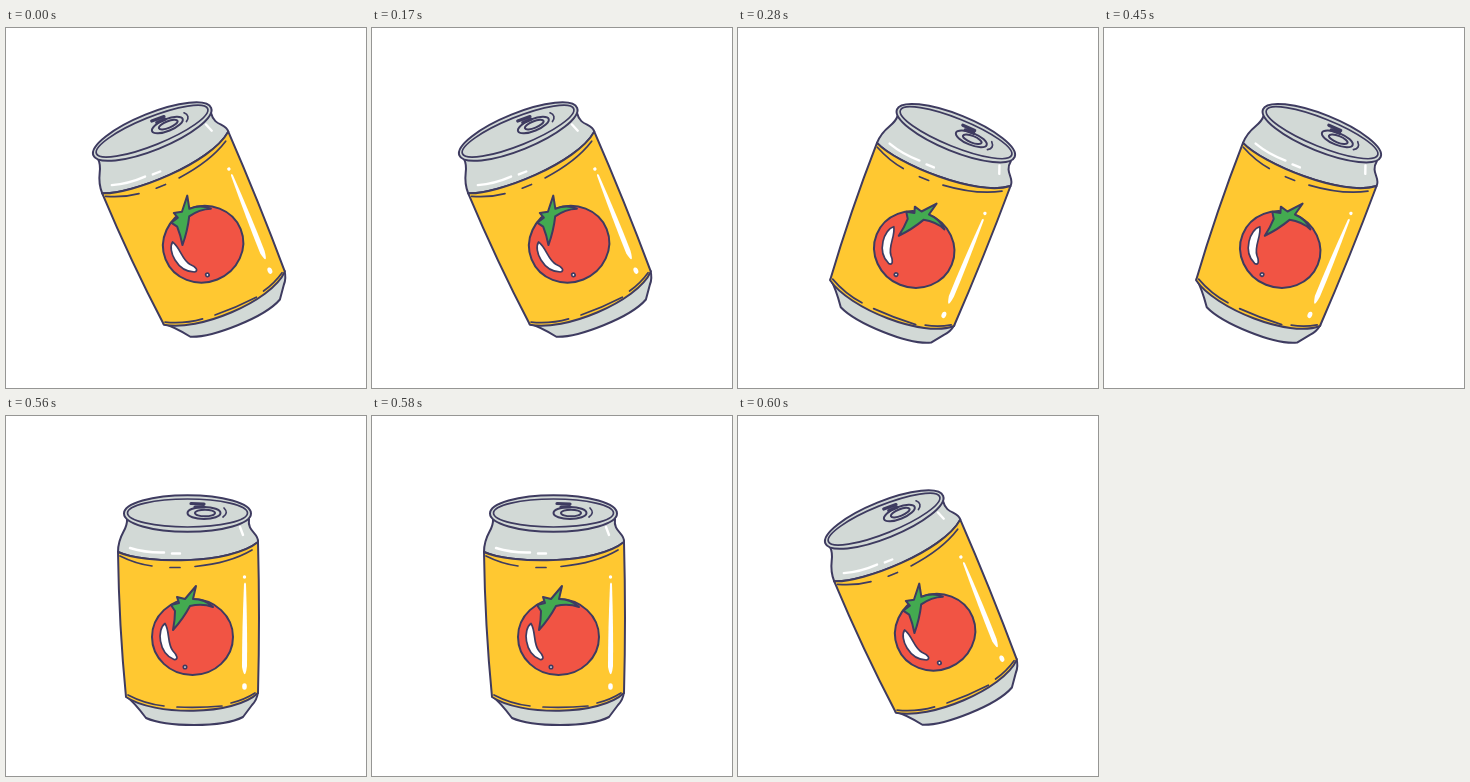
These frames come from a looping animation (360 px wide and 360 px high, 0.64 s). An HTML page:

```html
<!DOCTYPE html>
<html lang="en">
<head>
<meta charset="utf-8">
<title>Shaking can</title>
<style>
  html, body { margin: 0; width: 100%; height: 100%; overflow: hidden; background: #fff; }
  svg { display: block; width: 100vw; height: 100vh; }
  .ink { fill: none; stroke: #3e3b60; stroke-width: 2; stroke-linecap: round; stroke-linejoin: round; }
  .grey { fill: #d2d9d6; }
  .yellow { fill: #ffc831; }
  .red { fill: #f15444; }
  .green { fill: #43aa50; }
  .white { fill: #fff; }
  .shine { fill: none; stroke: #fff; stroke-width: 2.4; stroke-linecap: round; }
  .thin { stroke-width: 1.7; }
  .bold { stroke-width: 3.2; }
</style>
</head>
<body>
<svg viewBox="0 0 360 360">
  <g id="can">
    <!-- base -->
    <path class="ink grey" d="M120 280 C128 286 134 294 140 302 C160 311 216 312 237 301 L246 289 Q251 284 252 276 Z"/>
    <!-- neck -->
    <path class="ink grey" d="M121 103 C122 115 112 117 112 136 C138 148 224 149 252 126 C253 117 241 116 243 103 Z"/>
    <path class="shine" d="M124 132 Q140 137 158 136.500 M166 137.500 L174 137.500 M234 111 L237 119"/>
    <!-- label -->
    <path class="ink yellow" d="M112 136 C138 148 224 149 252 126 Q254 202 252 277 C228 300 148 300 120 281 Q113 210 112 136 Z"/>
    <path class="ink thin" d="M114 140 Q130 148 146 150 M164 151.500 L174 151.500 M189 150.500 Q224 147 246 134
      M122 279 Q139 288 158 290 M171 291 Q194 292 216 290 M225 287 Q238 284 249 277"/>
    <path class="white" d="M238 168 Q239 165 240 168 Q241.500 215 241 250 Q239 266 236 251 Q236 215 238 168 Z"/>
    <circle class="white" cx="238.500" cy="161" r="1.700"/>
    <ellipse class="white" cx="238.500" cy="270.500" rx="2.300" ry="3.300"/>
    <!-- lid -->
    <ellipse class="ink grey" cx="181.500" cy="97.500" rx="63.500" ry="18.300"/>
    <ellipse class="ink thin" cx="181.500" cy="97" rx="60" ry="14"/>
    <ellipse class="ink" cx="198" cy="97" rx="16.500" ry="6"/>
    <ellipse class="ink" cx="199" cy="97" rx="10" ry="3.300"/>
    <path class="ink bold" d="M185 87.500 L198 88 M189 91 L198 91"/>
    <path class="ink thin" d="M218 92 Q223 97 217 101"/>
    <!-- tomato -->
    <ellipse class="ink red" cx="186.500" cy="221" rx="40.500" ry="38"/>
    <path class="ink green" d="M190 170 L187 183 Q199 183 207 191 Q196 187 184 190 Q177 203 167 214 Q169 204 169 195 L165 189 L173 187 L171 181 L179 183 Z"/>
    <path class="ink white thin" d="M159 207.500 C151 213 152 237 168 243.500 C173 244 171 239 167 235 C161 228 164 215 159 207.500 Z"/>
    <circle class="ink white thin" cx="179" cy="251" r="1.700"/>
  </g>
</svg>
<script>
  const can = document.getElementById('can');
  const pivot = '183.75 186.75';
  // [end time in ms, x, y, angle]
  const poses = [
    [280, -2, -1.25, -22],
    [560, 2.75, 2, 22],
    [600, 0, 0, 0],
    [640, -2, -1.25, -22]
  ];

  function draw(now) {
    const t = now % 640;
    const [, x, y, angle] = poses.find(pose => t < pose[0]);
    can.setAttribute('transform', `translate(${x} ${y}) rotate(${angle} ${pivot})`);
    requestAnimationFrame(draw);
  }
  draw(0);
</script>
</body>
</html>
```
